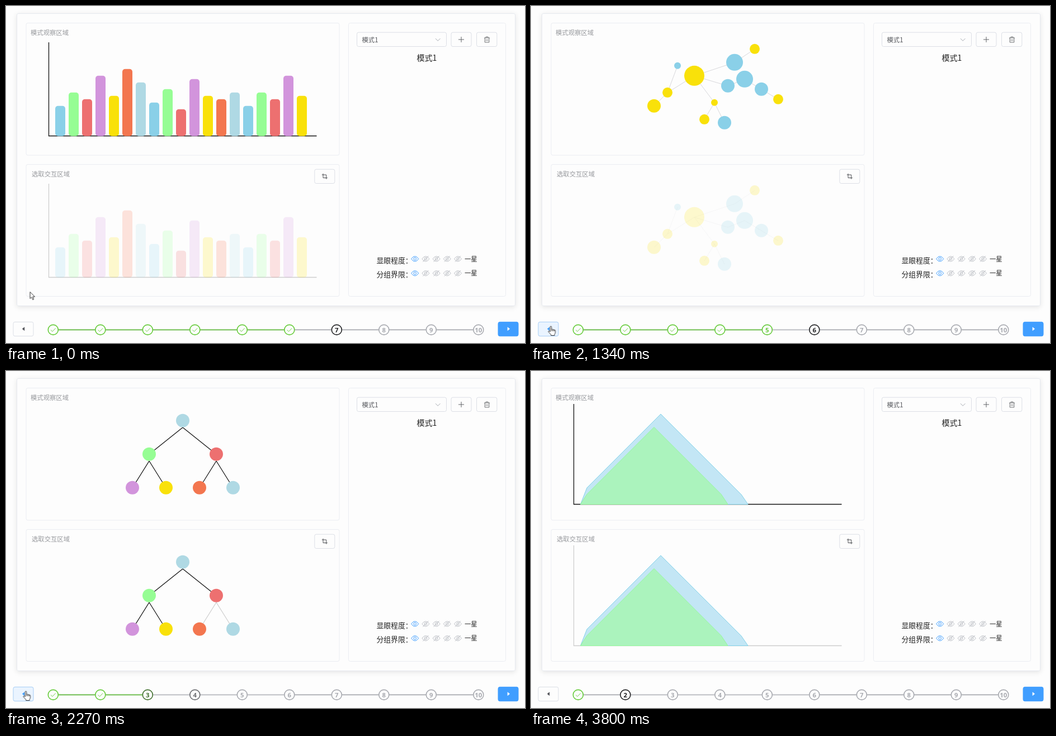
Write an HTML page that moves like this. It is 928 by 603 pixels and loops after 3.83 s.

```html
<!DOCTYPE html>
<html lang="zh-CN">
<head>
<meta charset="utf-8">
<title>模式观察</title>
<style>
  html, body { margin: 0; width: 100%; height: 100%; overflow: hidden; background: #fdfdfd; }
  .card {
    position: absolute; left: 19px; top: 13px; width: 890px; height: 522px;
    border: 1px solid #e6e9ef; border-radius: 3px;
    box-shadow: 0 2px 10px rgba(0, 0, 0, .1);
  }
  svg { position: absolute; left: 0; top: 0; display: block; }
  text { font-family: "Noto Sans CJK SC", "Noto Sans CJK", "Noto Sans", sans-serif; }
  .step text { font: 700 11.3px "Noto Sans", "Open Sans", sans-serif; text-anchor: middle; fill: currentColor; }
  .low .dim { opacity: .2; }
</style>
</head>
<body>
<div class="card"></div>
<svg id="stage" width="928" height="603" viewBox="0 0 928 603" fill="none"></svg>
<script>
const LOOP = 3830;
const CLICKS = { 6: 900, 5: 1340, 4: 1775, 3: 2215, 2: 2660 };
const HOVER = 280, LEAVE = 3420;
const GREEN = '#65cb39', DARK = '#202123', GRAY = '#a8aab0', BLUE = '#409eff', BG = '#fdfdfd';
const SKY = '#8ad0e8', LIME = '#96fd94', RED = '#ed7070', PLUM = '#d294dc',
      GOLD = '#f9e10a', CORAL = '#f3764f', PALE = '#afd9e4';

const stage = document.getElementById('stage');
let css = '', animCount = 0;

function add(parent, tag, attrs = {}, label) {
  const el = document.createElementNS('http://www.w3.org/2000/svg', tag);
  for (const k in attrs) el.setAttribute(k, attrs[k]);
  if (label !== undefined) el.textContent = label;
  parent.append(el);
  return el;
}
const line = (p, x1, y1, x2, y2, attrs) => add(p, 'line', { x1, y1, x2, y2, ...attrs });
const path = (p, d, attrs) => add(p, 'path', { d, ...attrs });
const box = (p, x, y, width, height, attrs) => add(p, 'rect', { x, y, width, height, ...attrs });
const group = (p, x, y, attrs) => add(p, 'g', { transform: `translate(${x} ${y})`, ...attrs });
const write = (x, y, size, fill, label, attrs) =>
  add(stage, 'text', { x, y, 'font-size': size, fill, ...attrs }, label);

// Stops are [ms, value, easing]; without an easing the value holds until the next stop.
function animate(el, prop, stops) {
  const name = 'a' + animCount++;
  const all = [...stops, [LOOP, stops[stops.length - 1][1]]];
  css += `@keyframes ${name}{` + all.map(([t, v, ease = 'step-end']) =>
    `${(t / LOOP * 100).toFixed(4)}%{${prop}:${v};animation-timing-function:${ease}}`).join('') + '}';
  const old = el.style.animation;
  el.style.animation = (old ? old + ',' : '') + `${name} ${LOOP}ms infinite`;
}
function show(el, from, to) {
  const stops = from > 0 ? [[0, 'hidden'], [from, 'visible']] : [[0, 'visible']];
  if (to < LOOP) stops.push([to, 'hidden']);
  animate(el, 'visibility', stops);
}

// Charts
function axes(g, top, base) {
  path(g, `M76.5 ${top}V${base}H555.5`, { stroke: '#111', 'stroke-width': 1.3, class: 'dim' });
}

function bars(g) {
  const colors = [SKY, LIME, RED, PLUM, GOLD, CORAL, PALE];
  axes(g, 65, 232.5);
  [9, 13, 11, 18, 12, 20, 16, 10, 14, 8, 17, 12, 11, 13, 9, 13, 11, 18, 12].forEach((h, i) =>
    box(g, 88 + 24 * i, 232.8 - 6 * h, 18, 6 * h, { rx: 5, fill: colors[i % 7], class: 'dim' }));
}

function boxPlot(g) {
  const colors = [PALE, LIME, RED, PLUM, GOLD, CORAL, SKY, LIME], mid = 190.7;
  axes(g, 65, 232.5);
  [30, 36, 18, 24, 12, 36, 30, 12].forEach((h, i) => {
    const x = 109 + 48 * i;
    const p = add(g, 'g', { class: 'dim', stroke: '#111', 'stroke-width': 1.3 });
    line(p, x + .3, mid - h - 12, x + .3, mid + h + 12);
    box(p, x - 9, mid - h, 18, 2 * h, { rx: 5, fill: colors[i], stroke: 'none' });
    line(p, x - 9, mid, x + 9, mid);
  });
}

function network(g) {
  const nodes = {
    a: [292, 125, 18, GOLD], b: [364, 101, 15, SKY], c: [400, 77, 9, GOLD],
    d: [382, 131, 15, SKY], e: [352, 143, 12, SKY], f: [412, 149, 12, SKY],
    g: [442, 167, 9, GOLD], h: [328, 173, 6, GOLD], i: [310, 203, 9, GOLD],
    j: [346, 209, 12, SKY], k: [262, 107, 6, SKY], l: [244, 155, 9, GOLD], m: [220, 179, 12, GOLD]
  };
  const links = add(g, 'g', { stroke: '#cfcfd2', 'stroke-width': .8, class: 'dim' });
  for (const [p, q] of 'kl lm la ab bc ae ah hi hj ed df fg'.split(' ')) {
    line(links, nodes[p][0], nodes[p][1], nodes[q][0], nodes[q][1]);
  }
  for (const [cx, cy, r, fill] of Object.values(nodes)) {
    add(g, 'circle', { cx, cy: cy - .2, r, fill, class: 'dim' });
  }
}

function tree(g) {
  const nodes = [[316, 89, PALE], [256, 149, LIME], [376, 149, RED],
    [226, 209, PLUM], [286, 209, GOLD], [346, 209, CORAL], [406, 209, PALE]];
  nodes.slice(1).forEach(([x, y], i) => {
    const [px, py] = nodes[i >> 1];
    line(g, px, py + 12, x, y, { stroke: '#111', 'stroke-width': 1.3, class: i > 3 ? 'dim' : '' });
  });
  for (const [cx, cy, fill] of nodes) add(g, 'circle', { cx, cy: cy - .2, r: 12, fill });
}

function area(g) {
  axes(g, 59, 238.5);
  path(g, 'M88.5 238.5L100 209L232 77L376 221L388 238.5Z', { fill: '#c3e6f5', stroke: '#84d2e8' });
  path(g, 'M88.5 238.5L100 220.5L220 100.5L340 220.5L352 238.5Z', { fill: '#abf3bd', stroke: '#94f79c' });
}

// Panels and controls
for (const [x, y, w, h] of [[36, 30.5, 560, 236.5], [36, 283.5, 560, 236], [612.5, 30.5, 281, 489]]) {
  box(stage, x, y, w, h, { rx: 3, stroke: '#ebedf2' });
}
write(44, 51.5, 11.33, '#97999d', '模式观察区域');
write(46, 304.5, 11.33, '#97999d', '选取交互区域');

const control = (x, y, w, fill = BG, stroke = '#dcdfe6') =>
  box(stage, x, y, w, 25.3, { rx: 3, fill, stroke });
control(627.5, 47.2, 160);
write(636.5, 64.8, 11.33, '#55575c', '模式1');
path(stage, 'M768 58.2l4.2 4.2l4.2-4.2', { stroke: '#a8abb2' });
control(796, 47.2, 36);
path(stage, 'M809 60H819M814 55V65', { stroke: '#606266' });
control(841.5, 47.2, 36.3);
path(stage, 'M855 57H865M858 57V55.2H862V57M856.2 57V65H863.8V57M858.7 59.5V62.6M861.3 59.5V62.6', { stroke: '#606266', 'stroke-width': .9 });
control(551.8, 292.2, 36);
path(stage, 'M567 299.8V307.5H574.8M564.8 302H572.6V309.8', { stroke: '#505257' });
write(752.5, 98, 14, '#222', '模式1', { 'text-anchor': 'middle' });

function rating(label, y) {
  write(662.5, y + 7.2, 12.8, '#222', label);
  for (let i = 0; i < 5; i++) {
    const g = group(stage, 731.2 + 19.2 * i, y, { stroke: i ? '#bcbfc5' : BLUE, 'stroke-width': 1 });
    path(g, 'M-6.5 0Q-3.5 -4.6 0 -4.6T6.5 0Q3.5 4.6 0 4.6T-6.5 0Z');
    add(g, 'circle', { r: 2.3 });
    if (i) line(g, -5, 5.2, 5, -5.2);
  }
  write(820, y + 4.2, 11.33, '#222', '一星');
}
rating('显眼程度：', 452.5);
rating('分组界限：', 478.2);

[[bars, 0, CLICKS[6]], [boxPlot, CLICKS[6], CLICKS[5]], [network, CLICKS[5], CLICKS[4]],
 [tree, CLICKS[4], CLICKS[2]], [area, CLICKS[2], LOOP]].forEach(([draw, from, to]) => {
  const g = add(stage, 'g');
  draw(add(g, 'g'));
  draw(group(g, 0, 253, { class: 'low' }));
  show(g, from, to);
});

// Step bar
const stepX = i => 84.3 + 84.5 * i, STEP_Y = 579.4, FADE = 150;

for (let i = 0; i < 9; i++) {
  const g = group(stage, stepX(i), STEP_Y, { 'stroke-width': 1.6 });
  line(g, 0, 0, 84.5, 0, { stroke: GRAY });
  if (i > 4) continue;
  const done = line(g, 0, 0, 84.5, 0, { stroke: GREEN });
  const start = CLICKS[i + 2] + FADE * i;
  const cut = CLICKS[i + 1] || LOOP;
  const stops = [[0, 'scaleX(1)']];
  if (start < cut) stops.push([start, 'scaleX(1)', 'ease-out']);
  stops.push([Math.min(start + FADE, cut), 'scaleX(0)']);
  animate(done, 'transform', stops);
}

for (let n = 1; n <= 10; n++) {
  const g = group(stage, stepX(n - 1), STEP_Y, { class: 'step' });
  const on = CLICKS[n], off = CLICKS[n - 1];
  const first = n < 7 ? GREEN : n === 7 ? DARK : GRAY;
  g.style.color = first;
  add(g, 'circle', { r: 9, fill: BG, stroke: 'currentColor', 'stroke-width': 1.6 });
  const colors = [[0, first]];
  if (on) colors.push([on, GREEN, 'ease-out'], [on + FADE, DARK]);
  if (off && n <= 7) colors.push([off, DARK, 'ease-out'], [off + FADE, GRAY]);
  if (colors.length > 1) animate(g, 'color', colors);
  if (n < 7) {
    const tick = path(g, 'M-4.3 .2L-1.3 3.1L4.4 -2.9', { stroke: 'currentColor', 'stroke-width': .9 });
    if (on) show(tick, 0, on);
  }
  if (n > 1) {
    const num = add(g, 'text', { y: 4.2 }, n);
    if (on) show(num, on, LOOP);
  }
}

// Back and forward buttons
const back = control(13, 565.4, 36);
const backArrow = path(stage, 'M33.2 574.3V581.3L28.8 577.8Z', { fill: '#505257' });
const hover = (el, prop, idle, lit, held = lit) => animate(el, prop, [
  [0, idle], [HOVER, idle, 'ease-out'], [HOVER + 100, lit],
  [CLICKS[6] - 80, held], [LEAVE, held, 'ease-out'], [LEAVE + 100, idle]]);
hover(back, 'fill', BG, '#eaf4ff');
hover(back, 'stroke', '#dcdfe6', '#c9e2fc', '#a6cdf5');
hover(backArrow, 'fill', '#505257', BLUE);
control(880, 565.4, 36, BLUE, BLUE);
path(stage, 'M896.6 574.3V581.3L901 577.8Z', { fill: '#fff' });

// Pointer
const pointer = add(stage, 'g', { fill: '#fff', stroke: '#333', 'stroke-width': 1, 'stroke-linejoin': 'round' });
animate(pointer, 'transform', [
  [0, 'translate(43px,511.5px)', 'ease-in-out'], [340, 'translate(35.5px,573px)']]);
show(path(pointer, 'M0 0V12L2.8 9.4L4.8 14L6.8 13.1L4.8 8.7H8.6Z'), 0, HOVER);
show(path(pointer, 'M-1.2 10V1.2Q-1.2 0 0 0T1.2 1.2V5.6Q2.6 4.6 3.6 6Q5 5.2 6 6.6Q8 6.2 8 8.2V11Q8 13 6.6 14.4V16.5H.2V15L-4.4 10Q-4.8 8.4 -3.2 8.4ZM1.2 5.6V8.8M3.6 6V9M6 6.6V9.2'), HOVER, LEAVE);

const sheet = document.createElement('style');
sheet.textContent = css;
document.head.append(sheet);
</script>
</body>
</html>
```
